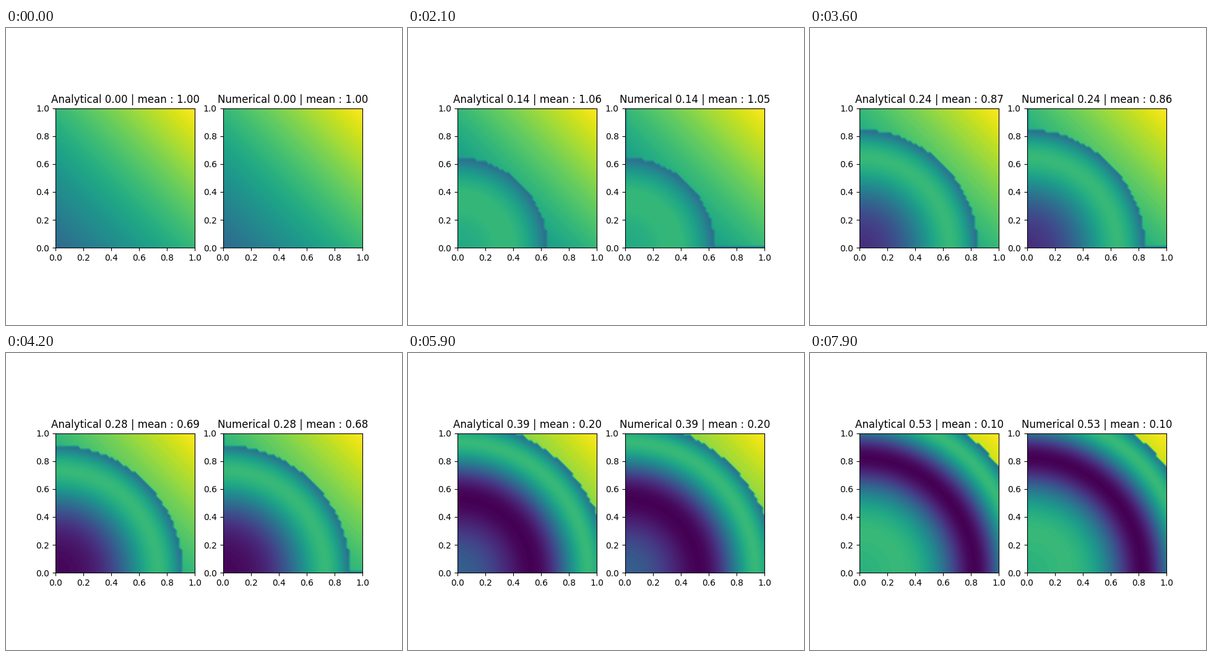
A matplotlib script that plays this animation: 640 px wide and 480 px high, repeating every 8 s.

```python
import numpy as np
import matplotlib.pyplot as plt
from matplotlib.animation import FuncAnimation

FRAMES, INTERVAL = 80, 100
DT = 1 / 150
GRID = 50
LEVELS = 100

axis = np.linspace(0, 1, GRID)
X, Y = np.meshgrid(axis, axis)
R2 = X**2 + Y**2
on_inflow = (X == 0) | (Y == 0)

fig, axes = plt.subplots(1, 2, figsize=(6.4, 4.8), dpi=100)
for ax in axes:
    ax.set(aspect="equal", xlim=(0, 1), ylim=(0, 1))
shown = []


def analytical(t):
    """Wave emitted at the corner; the initial ramp remains ahead of its front."""
    delay = t - R2 / 3
    return np.where(delay >= 0, np.sin(5 * np.pi * delay), X + Y)


def numerical(t):
    """Same wave, with the inflow edges held at zero ahead of the front."""
    u = analytical(t)
    if t > 0:
        u[on_inflow & (R2 > 3 * t)] = 0
    return u


def update(frame):
    while shown:
        shown.pop().remove()
    t = frame * DT
    for ax, name, solve in zip(axes, ("Analytical", "Numerical"),
                               (analytical, numerical)):
        u = solve(t)
        shown.append(ax.contourf(X, Y, u, LEVELS, vmin=-1, vmax=2))
        ax.set_title(f"{name} {t:.2f} | mean : {u.mean():.2f}")
    return shown


anim = FuncAnimation(fig, update, frames=FRAMES, interval=INTERVAL,
                     init_func=lambda: update(0), repeat=True, repeat_delay=0)
plt.show()
```
